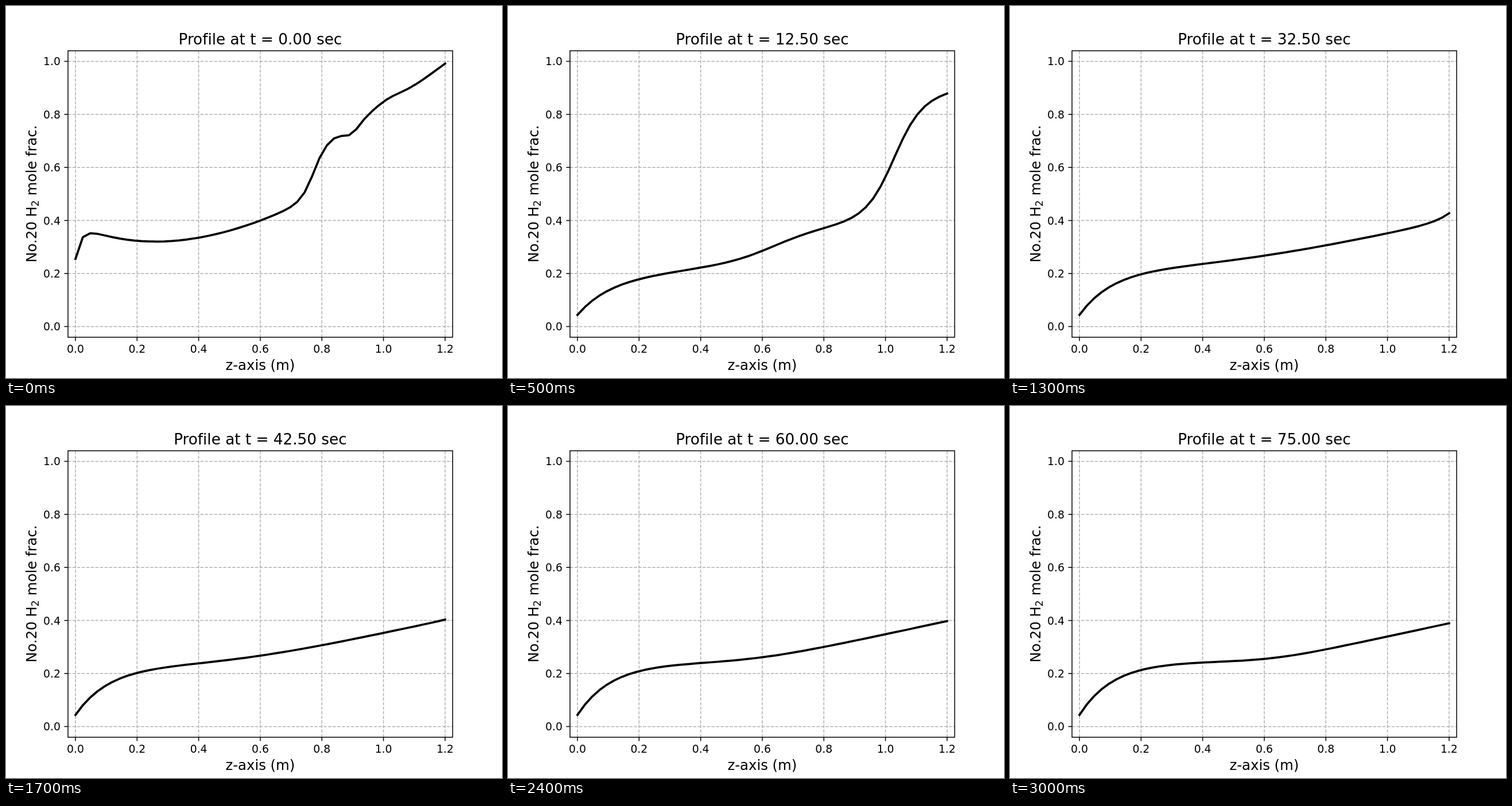
Write an HTML page that moves like this. It is 864x648 px and loops after 3100 ms.

```html
<!DOCTYPE html>
<html lang="en">
<head>
<meta charset="utf-8">
<title>Mole fraction profile</title>
<style>
  html, body { margin: 0; width: 100%; height: 100%; overflow: hidden; background: #fff; }
  svg { display: block; width: 864px; height: 648px; }
  text { font-family: "DejaVu Sans", sans-serif; font-variant-ligatures: none; fill: #000; }
  .tick { font-size: 18.75px; }
  .label { font-size: 24.375px; }
  .title { font-size: 26.25px; }
</style>
</head>
<body>
<svg viewBox="0 0 864 648" xmlns="http://www.w3.org/2000/svg">
  <g id="grid" fill="none" stroke="#b0b0b0" stroke-width="1.5" stroke-dasharray="5.55 2.4"></g>
  <g id="ticks" stroke="#000" stroke-width="1.5"></g>
  <path id="curve" fill="none" stroke="#000" stroke-width="3.75" stroke-linejoin="round" stroke-linecap="square"/>
  <rect x="108" y="78" width="670" height="499" fill="none" stroke="#000" stroke-width="1.5"/>
  <g id="numbers" class="tick"></g>
  <text id="title" class="title" x="442.9" y="67" text-anchor="middle"></text>
  <text class="label" x="442.9" y="634" text-anchor="middle">z-axis (m)</text>
  <text class="label" transform="translate(53.3 446.8) rotate(-90)">No.20 H<tspan font-size="17.06" dy="4">2</tspan><tspan dx="0.5" dy="-4"> mole frac.</tspan></text>
</svg>
<script>
const NS = "http://www.w3.org/2000/svg";
const $ = id => document.getElementById(id);
const LEFT = 108, BOTTOM = 577;
const X = z => 121 + z * 536.55, Y = v => 558.4 - v * 462;
const LENGTH = 1.2, NODES = 50;
const FRAME_MS = 100, FRAMES = 31, SEC_PER_FRAME = 2.5;

function add(parent, tag, attrs, text) {
  const el = document.createElementNS(NS, tag);
  for (const k in attrs) el.setAttribute(k, attrs[k]);
  if (text) el.textContent = text;
  $(parent).appendChild(el);
}

function drawAxes() {
  for (let i = 0; i <= 6; i++) {
    const x = X(i / 5), y = Y(i / 5), label = (i / 5).toFixed(1);
    add("grid", "path", { d: `M${x} ${BOTTOM}V78` });
    add("ticks", "path", { d: `M${x} ${BOTTOM}v6.6` });
    add("numbers", "text", { x, y: 604, "text-anchor": "middle" }, label);
    if (i > 5) continue;
    add("grid", "path", { d: `M${LEFT} ${y}H778` });
    add("ticks", "path", { d: `M${LEFT} ${y}h-6.6` });
    add("numbers", "text", { x: 94.9, y: y + 6.9, "text-anchor": "end" }, label);
  }
}

const { exp, log, min } = Math;
const sigmoid = x => 1 / (1 + exp(-x));
const bump = x => exp(-x * x);
const softplus = (x, width) => width * log(1 + exp(x / width));
const smooth = x => x * x * (3 - 2 * x);

// Mole fraction along the column before the feed starts.
function initial(z) {
  const d = z - 0.26;
  return 0.3205 + 0.8 * d * d / (1 + 0.5 * d)
    - 0.1277 * exp(-z / 0.018)
    + 0.19 * sigmoid((z - 0.774) / 0.02)
    - 0.03 * bump((z - 0.895) / 0.035)
    + 0.018 * bump((z - 1.01) / 0.06);
}

const front = t => 0.78 + 0.0308 * t ** 0.826;

// Inlet rise, bending slope and a main front trailed by a fading step.
function flowing(z, t) {
  const rise = 0.212 - 0.1 * exp(-t / 33);
  const knee = 0.34 + 0.0038 * t, width = 0.4 * exp(-t / 45);
  const step = 0.155 * exp(-((t / 15) ** 3)), c = front(t);
  return 0.044 + rise * (1 - exp(-z / 0.11))
    + 0.25 * (softplus(z - knee, width) - softplus(-knee, width))
    + (0.51 - step) * sigmoid((z - c) / 0.044)
    + step * sigmoid((z - c + 0.395) / 0.07);
}

// The initial shape drifts with the front and is washed out, inlet first.
function fraction(z, t) {
  const u = min(1, t / 12.5);
  const fade = 1 - u ** (0.2 + 0.8 * min(1, z / 0.36));
  const from = z - (front(t) - front(0)) * smooth(min(1, z / 0.48));
  return flowing(z, t) + (fade && fade * (initial(from) - flowing(from, 0)));
}

function draw(ms) {
  const t = Math.floor(ms / FRAME_MS) % FRAMES * SEC_PER_FRAME;
  let d = "";
  for (let i = 0; i <= NODES; i++) {
    const z = LENGTH * i / NODES;
    d += `${i ? "L" : "M"}${X(z).toFixed(2)} ${Y(fraction(z, t)).toFixed(2)}`;
  }
  $("curve").setAttribute("d", d);
  $("title").textContent = `Profile at t = ${t.toFixed(2)} sec`;
}

drawAxes();
const start = performance.now();
function tick() {
  draw(performance.now() - start);
  requestAnimationFrame(tick);
}
tick();
</script>
</body>
</html>
```
